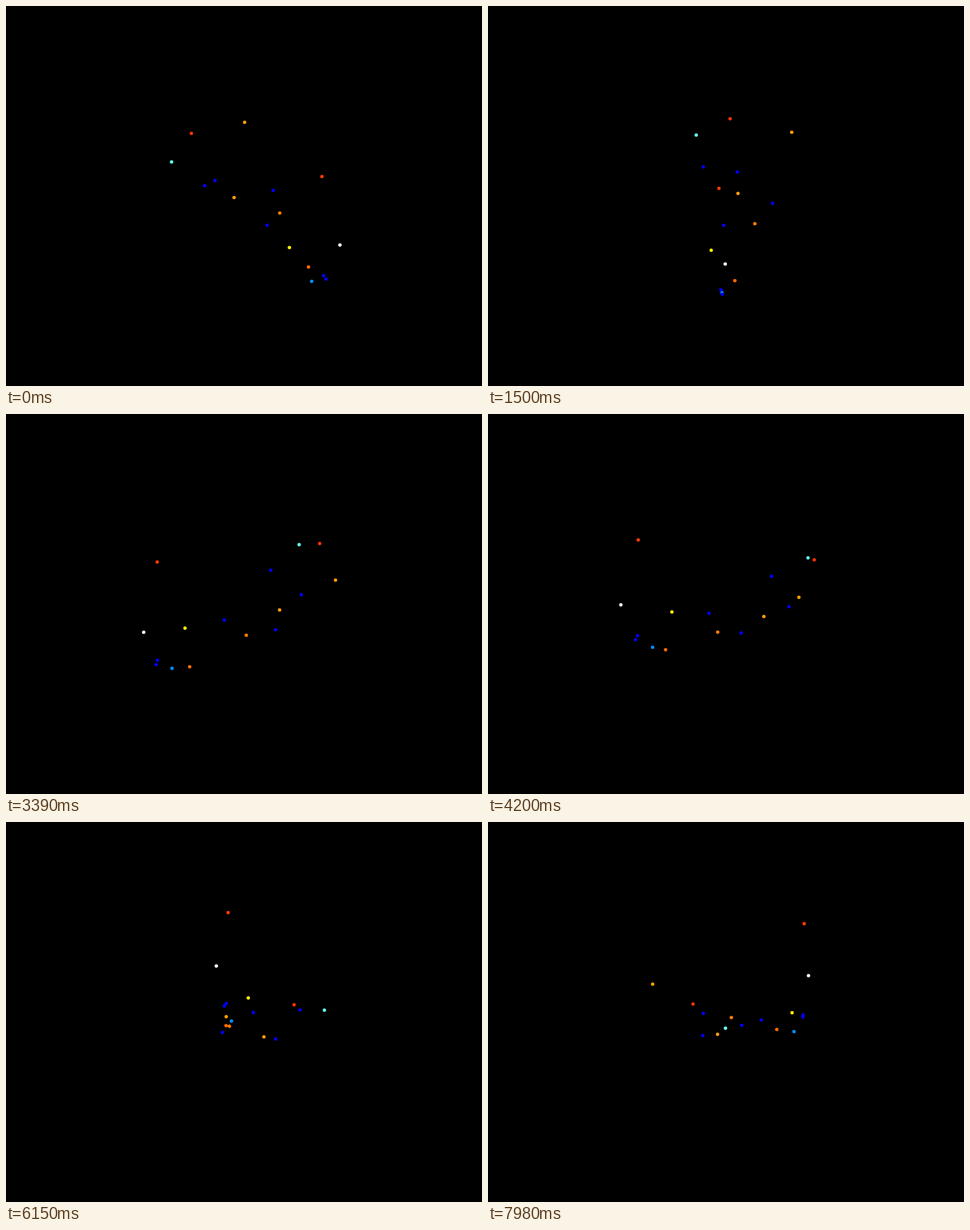
These frames come from a looping animation (837 px wide and 669 px high, 8000 ms). An HTML page with a canvas:

```html
<!DOCTYPE html>
<html lang="en">
<head>
<meta charset="utf-8">
<title>Rotating points</title>
<style>
  html, body { margin: 0; width: 100%; height: 100%; overflow: hidden; background: #000; }
  canvas { display: block; width: 837px; height: 669px; }
</style>
</head>
<body>
<canvas id="stage" width="837" height="669"></canvas>
<script>
const ctx = document.getElementById('stage').getContext('2d');

const LOOP = 8000, STEP = 30;          // ms; one degree of spin per step
const RADIUS = 3;
const CENTER = { x: 435.9, y: 330.9 };
const DISTANCE = 2784.5;               // camera distance in pixels
const RAD = Math.PI / 180;
const SIN_TILT = Math.sin(30 * RAD), COS_TILT = Math.cos(30 * RAD);

// sideways, towards the viewer, height, colour
const points = [
  [-111.1, -79.5, 78.6, '#ff3300'],
  [112.4, 130.4, 108.6, '#ff3b00'],
  [-16.8, -144.9, 66.9, '#ffa000'],
  [-35.4, -34.6, -27.5, '#ff9c0c'],
  [45.8, -5, -41.9, '#ff7c00'],
  [95.3, 82.3, -99.8, '#ff6a00'],
  [-144.7, -27.5, 49.3, '#62fff2'],
  [144.9, 144.6, -16, '#f6ffff'],
  [60.9, 106.2, -45, '#fff000'],
  [99.9, 114.8, -108.5, '#0090ff'],
  [-86.3, 3.8, 19.1, '#0000ff'],
  [-69.9, -62.1, -8.1, '#0000ff'],
  [34.6, -55.6, -24.7, '#0000ff'],
  [22.9, 47.2, -35.8, '#0000ff'],
  [119.3, 133.2, -84.8, '#0000ff'],
  [123.7, 133.6, -91.6, '#0000ff']
];

function project([side, front, height, color], angle) {
  const c = Math.cos(angle), s = Math.sin(angle);
  const p = side * c - front * s;
  const q = side * s + front * c;
  const depth = 1 - (q * COS_TILT + height * SIN_TILT) / DISTANCE;
  return {
    x: CENTER.x + p / depth,
    y: CENTER.y + (q * SIN_TILT - height * COS_TILT) / depth,
    depth,
    color
  };
}

function draw(now) {
  const angle = Math.floor((now % LOOP) / STEP) * RAD;
  ctx.fillStyle = '#000';
  ctx.fillRect(0, 0, 837, 669);
  const dots = points.map(point => project(point, angle)).sort((a, b) => b.depth - a.depth);
  for (const { x, y, color } of dots) {
    ctx.fillStyle = color;
    ctx.beginPath();
    ctx.arc(x, y, RADIUS, 0, 2 * Math.PI);
    ctx.fill();
  }
}

function tick(now) {
  draw(now);
  requestAnimationFrame(tick);
}

draw(0);
requestAnimationFrame(tick);
</script>
</body>
</html>
```
